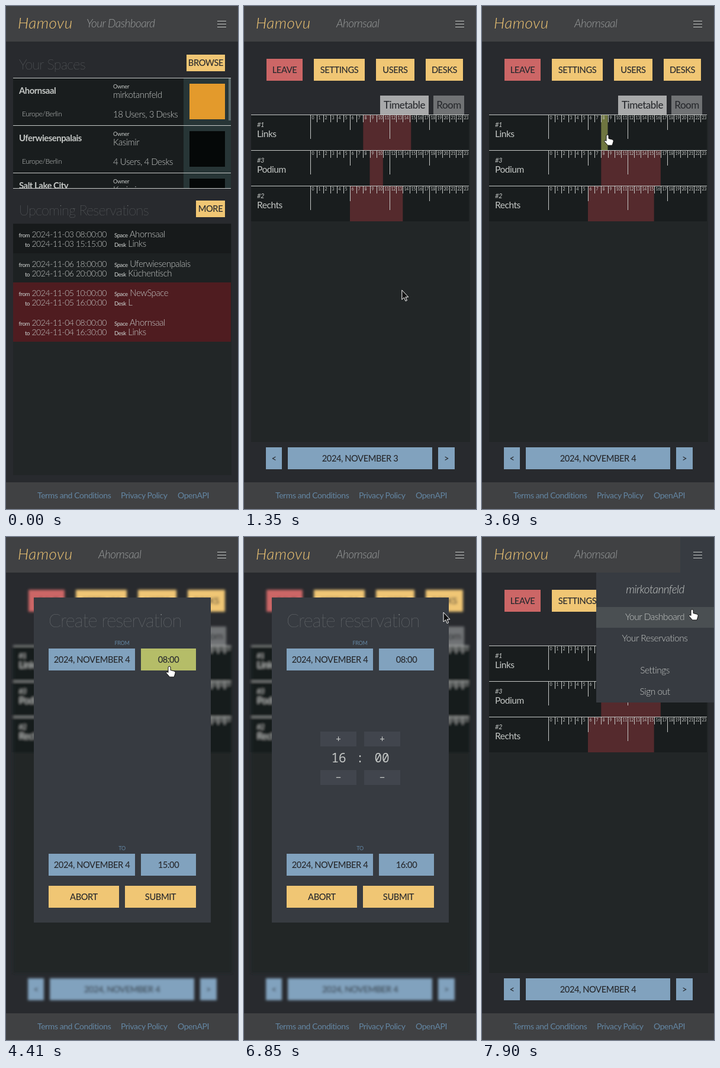
Write an HTML page that moves like this. It is 392 by 848 pixels and loops after 8000 ms.

```html
<!DOCTYPE html>
<html lang="en">
<head>
<meta charset="utf-8">
<title>Desk reservation</title>
<style>
html, body { margin: 0; width: 100%; height: 100%; overflow: hidden; background: #282a2e; }
svg { display: block; width: 100vw; height: 100vh; }
text { font-family: Lato, "Open Sans", sans-serif; letter-spacing: -.03em; fill: #c5c8c6; white-space: pre; }
.mid { text-anchor: middle; }
.end { text-anchor: end; }
.thin { font-weight: 100; fill: #8b8f90; }
.light { font-weight: 300; }
.bold { font-weight: 700; }
.italic { font-style: italic; }
.btn { font-weight: 500; fill: #282a2e; }
.link { fill: #6386a3; }
.mono { font-family: "Noto Sans Mono", "DejaVu Sans Mono", monospace; letter-spacing: 0; }
.small { font-size: 9.6px; font-weight: 500; }
.brand { fill: #f0c674; letter-spacing: .02em; }
.grey { fill: #9a9d9d; }
</style>
</head>
<body>
<svg id="stage" viewBox="0 0 392 848"></svg>
<script>
const LOOP = 8000;
const BG = '#282a2e', BAR = '#404143', PANEL = '#222627', ROW = '#191d1e', BOX = '#373b41', FG = '#c5c8c6';
const YELLOW = '#f0c674', BLUE = '#81a2be', GREEN = '#b5bd68', RED = '#cc6666', KEY = '#41454d';
const BOOKED = '#552a2d', PICKED = '#6f7640';

const rect = (x, y, w, h, fill, id = '') =>
  `<rect x="${x}" y="${y}" width="${w}" height="${h}" fill="${fill}" ${id && `id="${id}"`}/>`;
const text = (x, y, size, str, cls = '', id = '') =>
  `<text x="${x}" y="${y}" font-size="${size}" class="${cls}" ${id && `id="${id}"`}>${str}</text>`;
const group = (id, ...parts) => `<g id="${id}">${parts.join('')}</g>`;
const small = str => `<tspan class="small">${str}</tspan> `;

// Buttons remember their area so that the pointer can light them up.
const buttons = [];
function button(layer, x, y, w, h, label, fill, id = '') {
  const key = 'b' + buttons.length;
  buttons.push({ layer, x, y, w, h, fill, key });
  return rect(x, y, w, h, fill, key) + text(x + w / 2, y + h / 2 + 5.3, 14.7, label, 'btn mid', id);
}

function spaceCard(y, name, owner, count, picture) {
  return rect(12, y, 288, 80, ROW) + rect(300, y, 80, 80, '#273536') +
    rect(310, y + 10, 60, 60, picture) + rect(12, y, 368, 1, FG) +
    text(22, y + 27, 14.8, name, 'bold') + text(27, y + 65, 12, 'Europe/Berlin', 'light') +
    text(181, y + 18, 9.4, 'Owner') + text(181, y + 34, 15, owner, 'light') +
    text(181, y + 67, 15, count, 'light');
}

function reservation(y, fill, from, to, space, desk) {
  return rect(12, y, 368, 50, fill) +
    text(170, y + 23, 14, small('from') + from, 'light end') +
    text(170, y + 39, 14, small('to') + to, 'light end') +
    text(183, y + 23, 15, small('Space') + space, 'light') +
    text(183, y + 39, 15, small('Desk') + desk, 'light');
}

const hourX = h => 112 + h * 268 / 24;
const block = (row, from, to) =>
  rect(hourX(from), 184 + row * 60, hourX(to) - hourX(from), 59, BOOKED);

function deskRow(i, tag, name) {
  const y = 184 + i * 60;
  let out = rect(12, y - 1, 368, 1, FG) + text(22, y + 20, 11, tag, 'italic') + text(22, y + 37, 15.5, name);
  for (let h = 0; h < 24; h++) {
    const x = Math.round(hourX(h)), len = h % 12 ? h % 6 ? 12 : 25 : 40;
    out += rect(x, y, 1, len, FG) + text(x + 2.5, y + 7, 7, h);
  }
  return out;
}

const dashboard = group('dash',
  text(22, 107, 23.5, 'Your Spaces', 'thin'),
  button('dash', 305, 82, 65, 28, 'BROWSE', YELLOW),
  '<clipPath id="list"><path d="M12 121H380V307H12z"/></clipPath><g clip-path="url(#list)">',
  spaceCard(121, 'Ahornsaal', 'mirkotannfeld', '18 Users, 3 Desks', '#e39a2c'),
  spaceCard(201, 'Uferwiesenpalais', 'Kasimir', '4 Users, 4 Desks', '#050808'),
  spaceCard(281, 'Salt Lake City', 'Kasimir', '2 Users, 2 Desks', '#050808'),
  '</g>', rect(376, 122, 4, 71, '#5d6b6d'), rect(12, 307, 368, 1, FG),
  text(22, 353, 23.5, 'Upcoming Reservations', 'thin'),
  button('dash', 321, 328, 49, 28, 'MORE', YELLOW),
  rect(12, 367, 369, 424, PANEL),
  reservation(367, '#171a1b', '2024-11-03 08:00:00', '2024-11-03 15:15:00', 'Ahornsaal', 'Links'),
  reservation(417, '#1d2122', '2024-11-06 18:00:00', '2024-11-06 20:00:00', 'Uferwiesenpalais', 'Küchentisch'),
  reservation(466, '#4f1c20', '2024-11-05 10:00:00', '2024-11-05 16:00:00', 'NewSpace', 'L'),
  reservation(516, '#4f1c20', '2024-11-04 08:00:00', '2024-11-04 16:30:00', 'Ahornsaal', 'Links'));

const spacePage = group('space',
  group('guest',
    button('guest', 236, 89, 50, 37, 'JOIN', YELLOW),
    button('guest', 306, 89, 64, 37, 'USERS', YELLOW)),
  group('member',
    button('member', 38, 89, 61, 37, 'LEAVE', RED),
    button('member', 118, 89, 86, 37, 'SETTINGS', YELLOW),
    button('member', 223, 89, 65, 37, 'USERS', YELLOW),
    button('member', 307, 89, 63, 37, 'DESKS', YELLOW)),
  rect(230, 151, 82, 33, '#a8a9aa'), text(271, 173, 17, 'Timetable', 'btn mid'),
  rect(320, 151, 52, 33, '#707274'), text(346, 173, 17, 'Room', 'btn mid'),
  rect(12, 184, 370, 551, PANEL),
  group('rows',
    rect(12, 184, 368, 179, ROW),
    group('day3', block(0, 8, 15.25), block(1, 9, 11), block(2, 6, 14)),
    group('day4', block(1, 8, 17), block(2, 6, 16)),
    group('booked', block(0, 8, 16)),
    rect(hourX(8), 184, 0, 59, PICKED, 'pick'),
    deskRow(0, '#1', 'Links'), deskRow(1, '#3', 'Podium'), deskRow(2, '#2', 'Rechts')),
  button('space', 37, 744, 27, 37, '&lt;', BLUE),
  button('space', 74, 744, 244, 37, '', BLUE, 'date'),
  button('space', 328, 744, 28, 37, '&gt;', BLUE));

const DATE = '2024, NOVEMBER 4';
const modal = group('modal',
  rect(47, 102, 299, 548, BOX),
  text(72, 152, 31, 'Create reservation', 'thin'),
  `<g fill="${BLUE}">` + text(196, 182, 9, 'FROM', 'mid link') + text(196, 528, 9, 'TO', 'mid link') + '</g>',
  button('modal', 72, 188, 146, 37, DATE, BLUE),
  button('modal', 228, 188, 93, 37, '08:00', BLUE),
  button('modal', 72, 534, 146, 37, DATE, BLUE),
  button('modal', 228, 534, 93, 37, '', BLUE, 'until'),
  button('modal', 72, 588, 119, 37, 'ABORT', YELLOW),
  button('modal', 201, 588, 120, 37, 'SUBMIT', YELLOW),
  group('picker',
    ...[[129, 328, '+'], [203, 328, '+'], [129, 393, '−'], [203, 393, '−']].map(([x, y, sign], i) =>
      rect(x, y, 61, 25, KEY, 'key' + i) + text(x + 30.5, y + 18, 16, sign, 'mono mid')),
    text(160, 380, 21, '', 'mono mid', 'hour'), text(196, 380, 21, ':', 'mono mid'),
    text(233, 380, 21, '00', 'mono mid')));

const bars = rect(0, 0, 392, 60, BAR) + rect(335, 0, 57, 60, BOX, 'burger') +
  text(20, 38, 26, 'Hamovu', 'light italic brand') +
  text(136, 36, 19, 'Your Dashboard', 'light italic grey', 'title') +
  [25, 30, 35].map(y => rect(357, y, 15, 1, FG)).join('') +
  rect(0, 803, 392, 45, BAR) +
  text(53, 830, 14, 'Terms and Conditions', 'link') +
  text(194, 830, 14, 'Privacy Policy', 'link') + text(290, 830, 14, 'OpenAPI', 'link');

const menu = group('menu',
  rect(193, 60, 199, 219, BOX), rect(193, 118, 199, 35, '#4a4f52', 'item'),
  text(292.5, 95, 19, 'mirkotannfeld', 'light italic mid'),
  ...[[140, 'Your Dashboard'], [176, 'Your Reservations'], [230, 'Settings'], [266, 'Sign out']]
    .map(([y, s]) => text(292, y, 15.5, s, 'light mid')));

const pointer = group('pointer',
  '<path id="hand" fill="#fff" stroke="#111" d="M-2 1Q-2-1 0-1Q2-1 2 1V5.5L8 7Q10.5 7.6 10.2 10L9 14L8 17H.5L-5 10.5Q-6 8.5-4 8.2L-2 9.5Z"/>',
  '<path id="arrow" fill="#111" stroke="#fff" d="M0 0V16L3.7 12.6L6.2 18.5L8.6 17.4L6.2 11.8H11Z"/>');

const stage = document.getElementById('stage');
stage.innerHTML = '<filter id="blur"><feGaussianBlur stdDeviation="2"/></filter>' +
  rect(0, 0, 392, 848, BG) + group('body', dashboard, spacePage) + modal + bars + menu + pointer;

const $ = id => document.getElementById(id);
const show = (id, on) => $(id).setAttribute('display', on ? 'inline' : 'none');
const label = (id, s) => { if ($(id).textContent !== s) $(id).textContent = s; };
const inside = (p, x, y, w, h) => p.x >= x && p.x < x + w && p.y >= y && p.y < y + h;

// Pointer stops: time, x, y.
const path = [
  [120, 215, 420], [520, 191, 157], [940, 191, 157], [1730, 334, 764], [1840, 334, 764],
  [2000, 333, 767], [2520, 333, 767], [3090, 219, 222], [3270, 219, 222], [3420, 213, 220],
  [3610, 213, 220], [3690, 212, 218], [3900, 212, 218], [4230, 276, 219], [4510, 276, 219],
  [5200, 296, 553], [5450, 296, 553], [5810, 160, 336], [6080, 160, 336], [6460, 260, 604],
  [6570, 260, 604], [6850, 337, 127], [7200, 364, 30], [7500, 364, 30], [7900, 355, 123]
];

function pointerAt(t) {
  const i = path.findIndex(p => p[0] > t);
  if (i < 1) { const [, x, y] = path[i ? path.length - 1 : 0]; return { x, y }; }
  const [t0, x0, y0] = path[i - 1], [t1, x1, y1] = path[i];
  const u = (t - t0) / (t1 - t0), e = u * u * (3 - 2 * u);
  return { x: x0 + (x1 - x0) * e, y: y0 + (y1 - y0) * e };
}

function draw(t) {
  const p = pointerAt(t);
  const loaded = t >= 780, onSpace = t >= 730, nextDay = t >= 2340;
  const open = t >= 4410 && t < 6960, menuOpen = t >= 7520;
  const layers = {
    dash: !onSpace, space: onSpace, guest: onSpace && !loaded, member: loaded, rows: loaded,
    day3: !nextDay, day4: t >= 2500, booked: t >= 6960, modal: open, picker: t >= 5440,
    menu: menuOpen, pointer: t >= 120
  };
  for (const id in layers) show(id, layers[id]);
  $('body').setAttribute('filter', open ? 'url(#blur)' : 'none');

  const title = $('title');
  title.setAttribute('x', onSpace ? 156 : 136);
  label('title', !onSpace ? 'Your Dashboard' : loaded ? 'Ahornsaal' : '');
  label('date', '2024, NOVEMBER ' + (nextDay ? 4 : 3));
  const hour = t < 6010 ? '15' : '16';
  label('until', hour + ':00');
  label('hour', hour);

  const dragged = Math.floor((p.x - 112) / (268 / 24)) - 7;
  const hours = t < 3650 || t >= 6960 ? 0 : t < 4300 ? Math.max(1, dragged) : 7;
  $('pick').setAttribute('width', hours * 268 / 24);

  let hot = t < 940;
  for (const b of buttons) {
    const active = layers[b.layer] && !menuOpen && (b.layer === 'modal' || !open);
    const over = t >= 120 && active && inside(p, b.x, b.y, b.w, b.h);
    $(b.key).setAttribute('fill', over ? GREEN : b.fill);
    hot = hot || over;
  }
  const onKey = open && t >= 5440 && inside(p, 129, 328, 61, 25);
  $('key0').setAttribute('fill', onKey ? '#50555d' : KEY);
  const onBurger = t >= 780 && inside(p, 335, 0, 57, 60);
  show('burger', onBurger || menuOpen);
  const onItem = menuOpen && inside(p, 193, 118, 199, 35);
  show('item', onItem);
  const onTable = loaded && !open && !menuOpen && inside(p, 112, 184, 268, 179);
  hot = hot || onKey || onBurger || onItem || onTable;

  show('hand', hot);
  show('arrow', !hot);
  $('pointer').setAttribute('transform', `translate(${p.x.toFixed(1)} ${p.y.toFixed(1)})`);
}

const start = performance.now();
function tick() {
  draw((performance.now() - start) % LOOP);
  requestAnimationFrame(tick);
}
tick();
</script>
</body>
</html>
```
